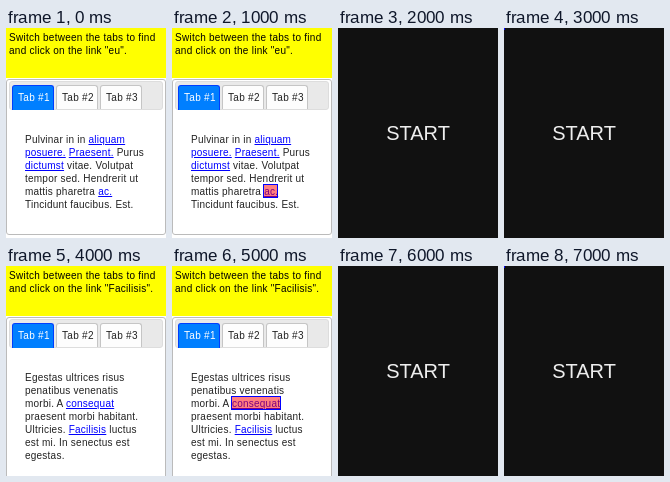
An HTML page for the animation above (8 s loop, 160x210 px).

```html
<!DOCTYPE html>
<html lang="en">
<head>
<meta charset="utf-8">
<title>Tabs task</title>
<style>
  * { box-sizing: border-box; margin: 0; padding: 0; }
  html, body { width: 100%; height: 100%; overflow: hidden; background: #fff; }
  body { font: 10px/13px "Liberation Sans", Arial, sans-serif; }
  .stage { position: relative; width: 160px; height: 210px; overflow: hidden; }
  .stage div, .stage p, .stage i { position: absolute; white-space: nowrap; }

  .page { inset: 0; background: #fff; letter-spacing: .23px; }
  .query { left: 0; top: 0; width: 160px; height: 50px; padding: 3px; background: #ff0; color: #000; letter-spacing: .26px; }
  .widget { left: 0; top: 51px; width: 160px; border: 1px solid #bbb; border-radius: 3px; }
  .bar { left: 3px; top: 53px; width: 154px; height: 29px; background: #e9e9e9; border: 1px solid #ddd; border-radius: 3px; }
  .tab {
    top: 57px; width: 42px; height: 24px; padding: 5px 0 0 5px;
    background: #fdfdfd; color: #222; letter-spacing: .3px;
    border: 1px solid #c5c5c5; border-bottom: 0; border-radius: 3px 3px 0 0;
  }
  .tab.on { height: 25px; background: #007fff; border-color: #003eff; color: #fff; }
  .text { left: 19px; top: 105px; color: #222; }
  .text u { color: #00f; }
  .mark { height: 14px; background: rgba(255, 0, 0, .5); border: 1px solid #00f; }

  .cover { inset: 0; background: #111; color: #eee; font-size: 20px; line-height: 210px; text-align: center; }
  .dot { left: 0; top: 0; width: 1px; height: 2px; background: #00f; }

  .second { animation: half 8s step-end infinite; }
  .cover { animation: half 4s step-end infinite; }
  .mark { animation: quarter 4s step-end infinite; }
  .dot { animation: last 4s step-end infinite; }
  @keyframes half { 0% { opacity: 0; } 50%, 100% { opacity: 1; } }
  @keyframes quarter { 0% { opacity: 0; } 25%, 100% { opacity: 1; } }
  @keyframes last { 0% { opacity: 0; } 75%, 100% { opacity: 1; } }
</style>
</head>
<body>
<div class="stage">
  <div class="page">
    <p class="query">Switch between the tabs to find<br>and click on the link "eu".</p>
    <div class="widget" style="height:156px"></div>
    <div class="bar"></div>
    <div class="tab on" style="left:6px">Tab #1</div>
    <div class="tab" style="left:50px">Tab #2</div>
    <div class="tab" style="left:94px">Tab #3</div>
    <p class="text">Pulvinar in in <u>aliquam</u><br><u>posuere.</u> <u>Praesent.</u> Purus<br><u>dictumst</u> vitae. Volutpat<br>tempor sed. Hendrerit ut<br>mattis pharetra <u>ac.</u><br>Tincidunt faucibus. Est.</p>
    <i class="mark" style="left:91px;top:156px;width:15px"></i>
  </div>

  <div class="page second">
    <p class="query">Switch between the tabs to find<br>and click on the link "Facilisis".</p>
    <div class="widget" style="height:169px"></div>
    <div class="bar"></div>
    <div class="tab on" style="left:6px">Tab #1</div>
    <div class="tab" style="left:50px">Tab #2</div>
    <div class="tab" style="left:94px">Tab #3</div>
    <p class="text">Egestas ultrices risus<br>penatibus venenatis<br>morbi. A <u>consequat</u><br>praesent morbi habitant.<br>Ultricies. <u>Facilisis</u> luctus<br>est mi. In senectus est<br>egestas.</p>
    <i class="mark" style="left:59px;top:130px;width:50px"></i>
  </div>

  <div class="cover">START<i class="dot"></i></div>
</div>
</body>
</html>
```
